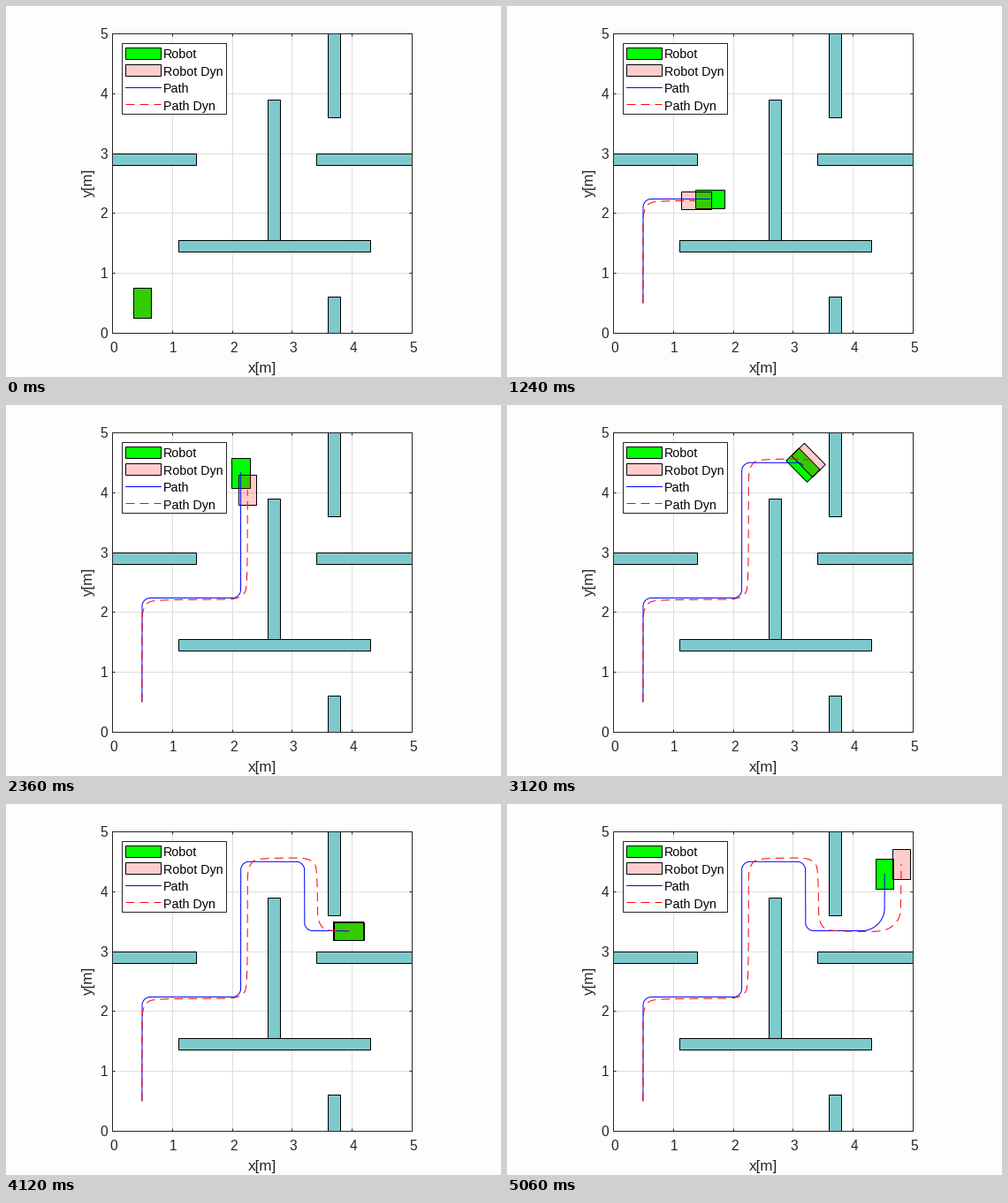
A matplotlib script that plays this animation: 560 px wide and 420 px high, repeating every 5.09 s.

```python
import numpy as np
import matplotlib.pyplot as plt
from matplotlib.animation import FuncAnimation
from matplotlib.patches import Polygon, Rectangle

W, H, DPI = 560, 420, 70
PX = 72 / DPI                      # one pixel in points
LOOP, FRAMES, SUB = 5090, 170, 6   # ms, frames, trail samples per frame

START, SPEED, LAG = 0.06, 3.05, 0.1   # s, m/s, s

INK = "#262626"
WALL = "#7ec9cb"
GREEN = "#00ff00"
PINK = (1, 0, 0, 0.2)

plt.rcParams["font.family"] = "Liberation Sans"

# Way points of the planned route and of the wider one the dynamic model chases
ROUTE = np.array([(.5, .5), (.5, 2.235), (2.147, 2.235), (2.147, 4.495),
                  (3.21, 4.495), (3.21, 3.34), (4.53, 3.34), (4.53, 4.29)])
WIDE = np.array([(.5, .5), (.5, 2.21), (2.26, 2.21), (2.26, 4.56),
                 (3.43, 4.56), (3.43, 3.325), (4.81, 3.325), (4.81, 4.9)])
RADII, WIDE_RADII = [.14] * 5 + [.38], [.2] * 5 + [.38]


def schedule():
    """Start and end of each turn, and the arrival time."""
    t, used, turns = START, 0, []
    legs = np.hypot(*np.diff(ROUTE, axis=0).T)
    for leg, r in zip(legs, RADII):
        t += (leg - used - r) / SPEED
        turns.append((t, t + 1.346 * r ** 0.7))
        t, used = turns[-1][1], r
    return turns, t + (legs[-1] - used) / SPEED


def pose(t, points, radii):
    """x, y and heading: straight legs joined by quarter circles."""
    t0, a = START, points[0]
    t = np.clip(t, START, END)
    for k, (t1, t2) in enumerate(TURNS):
        p, r = points[k + 1], radii[k]
        u, v = p - points[k], points[k + 2] - p
        u, v = u / np.hypot(*u), v / np.hypot(*v)
        b = p - r * u
        if t < t1:
            return (*(a + (b - a) * (t - t0) / (t1 - t0)), np.arctan2(u[1], u[0]))
        if t < t2:
            q = np.pi / 2 * (t - t1) / (t2 - t1)
            pos = b + r * v + r * (u * np.sin(q) - v * np.cos(q))
            d = u * np.cos(q) + v * np.sin(q)
            return (*pos, np.arctan2(d[1], d[0]))
        t0, a = t2, p + r * v
    pos = a + (points[-1] - a) * (t - t0) / (END - t0)
    return (*pos, np.arctan2(v[1], v[0]))


def body(x, y, angle):
    c, s = np.cos(angle), np.sin(angle)
    box = np.array([(-.25, -.15), (.25, -.15), (.25, .15), (-.25, .15)])
    return box @ np.array([(c, s), (-s, c)]) + (x, y)


TURNS, END = schedule()
step = LOOP / 1000 / FRAMES
clock = (np.arange(FRAMES * SUB) / SUB + 0.5) * step
plan = np.array([pose(t, ROUTE, RADII) for t in clock])

# The dynamic model trails its goal with a first-order lag
dyn = np.array([pose(t, WIDE, WIDE_RADII)[:2] for t in clock])
gain = 1 - np.exp(-step / SUB / LAG)
for n in range(1, len(dyn)):
    dyn[n] = dyn[n - 1] + gain * (dyn[n] - dyn[n - 1])

fig = plt.figure(figsize=(W / DPI, H / DPI), dpi=DPI, facecolor="#fdfdfd")
ax = fig.add_axes([120 / W, 50 / H, 339 / W, 339 / H])
ax.set(xlim=(0, 5), ylim=(0, 5), xticks=range(6), yticks=range(6))
ax.set_axisbelow(True)
ax.grid(color="#dedede", lw=PX)
ax.tick_params(direction="in", length=3.5 * PX, width=PX, color=INK, top=True,
               right=True, labelbottom=False, labelleft=False)
for spine in ax.spines.values():
    spine.set(color=INK, linewidth=PX)

EDGE = dict(ec="black", lw=PX)
SOLID = dict(color="#0000ff", lw=PX)
DASHED = dict(color="#ff0000", lw=PX, ls=(0, (10, 6)), dash_capstyle="butt")

for x, y, w, h in [(0, 2.8, 1.4, .2), (3.4, 2.8, 1.6, .2), (3.6, 3.6, .2, 1.4),
                   (3.6, 0, .2, .6), (2.6, 1.55, .2, 2.35), (1.1, 1.35, 3.2, .2)]:
    ax.add_patch(Rectangle((x, y), w, h, fc=WALL, **EDGE))

robot = ax.add_patch(Polygon(body(*plan[0]), fc=GREEN, zorder=2.1, **EDGE))
robot_dyn = ax.add_patch(Polygon(body(*plan[0]), fc=PINK, zorder=2.2, **EDGE))
path, = ax.plot([], [], zorder=2.3, **SOLID)
path_dyn, = ax.plot([], [], zorder=2.4, **DASHED)

# Overlay in pixels for the legend and all lettering
top = fig.add_axes([0, 0, 1, 1])
top.set(xlim=(0, W), ylim=(H, 0))
top.axis("off")


def label(x, y, text, size, color=INK, **kw):
    top.text(x, y, text, size=size * PX, color=color, **kw)


top.add_patch(Rectangle((131, 42), 118, 80, fc="white", ec=INK, lw=PX))
for y, fill in ((47, GREEN), (66, "#ffcccc")):
    top.add_patch(Rectangle((135, y), 40, 13, fc=fill, **EDGE))
top.plot([135, 175], [92, 92], **SOLID)
top.plot([135, 175], [111, 111], **DASHED)
for k, name in enumerate(("Robot", "Robot Dyn", "Path", "Path Dyn")):
    label(177.5, 59 + 19.6 * k, name, 14.2, "black")
for k in range(6):
    label(121.5 + 67.8 * k, 392.5, k, 15.5, ha="center")
    label(115, 376 - 67.8 * k, k, 15.5, ha="right")
label(290, 410, "x[m]", 17, ha="center", va="center")
label(94, 201, "y[m]", 17, ha="center", va="center", rotation=90)


def update(i):
    n = i * SUB
    robot.set_xy(body(*plan[n]))
    robot_dyn.set_xy(body(*dyn[n], plan[n, 2]))
    path.set_data(plan[:n + 1, 0], plan[:n + 1, 1])
    path_dyn.set_data(dyn[:n + 1, 0], dyn[:n + 1, 1])
    return robot, robot_dyn, path, path_dyn


anim = FuncAnimation(fig, update, frames=FRAMES, interval=LOOP / FRAMES,
                     repeat=True, cache_frame_data=False)
plt.show()
```
